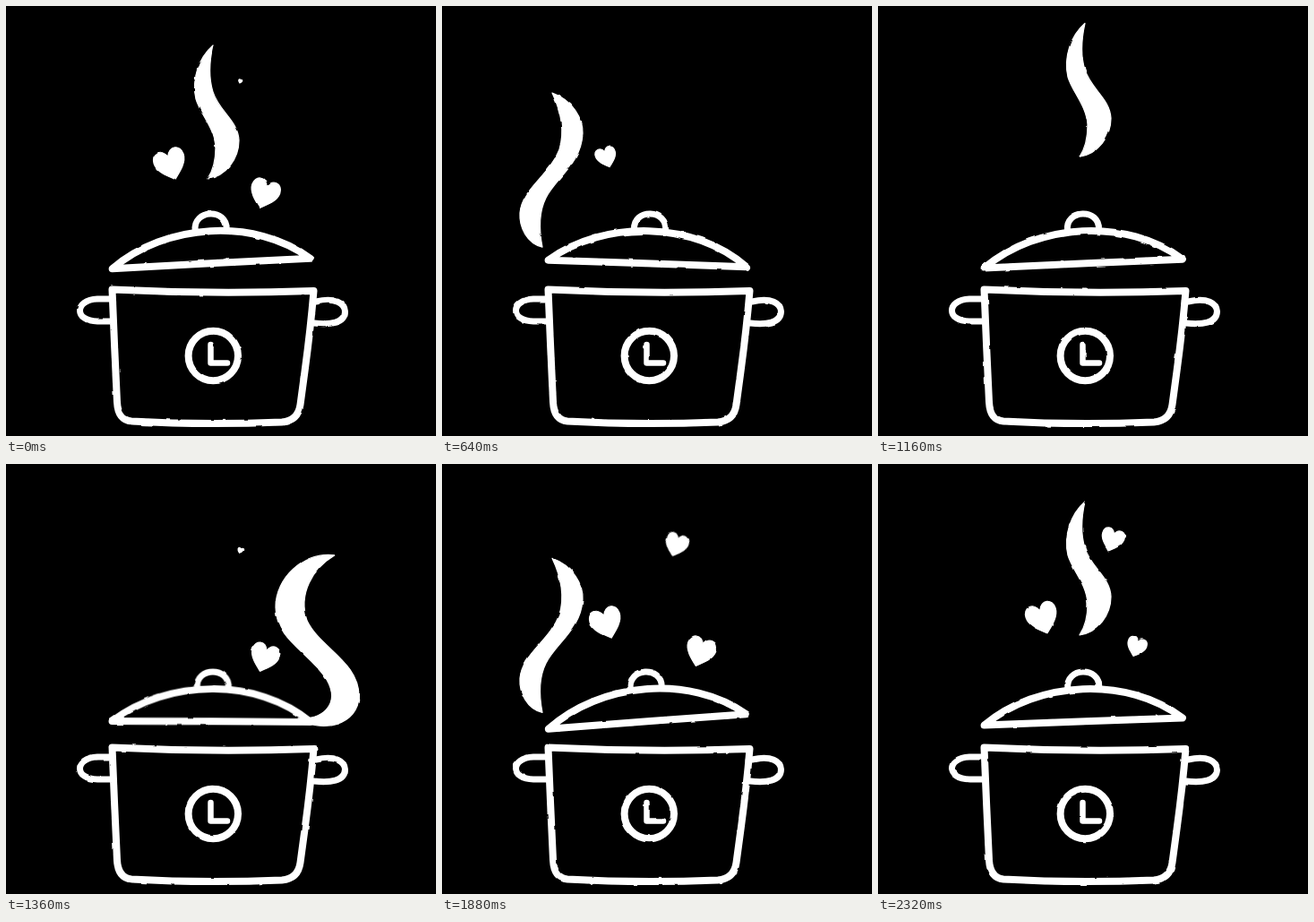
An HTML page for the animation above (2.36 s loop, 480 by 480 pixels).

```html
<!DOCTYPE html>
<html lang="en">
<head>
<meta charset="utf-8">
<title>Simmering pot</title>
<style>
  html, body { margin: 0; width: 100%; height: 100%; overflow: hidden; background: #000; }
  svg { display: block; width: 100%; height: 100%; }
  .line { fill: none; stroke: #fff; stroke-width: 8; stroke-linecap: round; stroke-linejoin: round; }
  .thin { stroke-width: 7; }
  .fill { fill: #fff; stroke: #fff; stroke-width: 1.2; stroke-linejoin: round; }
  .fill path { vector-effect: non-scaling-stroke; }
</style>
</head>
<body>
<svg viewBox="0 0 480 480">
  <defs>
    <filter id="rough" filterUnits="userSpaceOnUse" x="0" y="0" width="480" height="480" color-interpolation-filters="sRGB">
      <feTurbulence id="noise" type="fractalNoise" baseFrequency="0.08" numOctaves="1" seed="1"/>
      <feDisplacementMap in="SourceGraphic" scale="2.5" xChannelSelector="R" yChannelSelector="G"/>
    </filter>
  </defs>
  <g filter="url(#rough)">
    <g class="line">
      <path d="M118.500 316.500Q230 322 343.500 318Q340 360 333.500 408L328.500 445Q326 463 308 464.500Q220 468 140 463.500Q125 462 124 442Q121 380 118.500 316.500Z"/>
      <path class="thin" d="M117 327H102C76 328 76 352 102 352H117"/>
      <path class="thin" d="M346 330C368 325 378 332 378.500 341C378 354 362 356 344 354"/>
      <circle cx="231.300" cy="390.500" r="27.700"/>
      <path style="stroke-width:6.500" d="M228.500 378V398.500H247"/>
    </g>
    <g id="lid" class="line">
      <path d="M118.500 288C180 240 280 238 340 287Q230 287 118.500 288Z"/>
      <path class="thin" d="M213 250C211 226 250 226 248 250"/>
    </g>
    <g id="puffs" class="fill"></g>
    <g id="hearts" class="fill"></g>
  </g>
</svg>
<script>
const LOOP = 2360;
const $ = id => document.getElementById(id);

function addPath(parent, d) {
  const p = document.createElementNS('http://www.w3.org/2000/svg', 'path');
  p.setAttribute('d', d);
  return $(parent).appendChild(p);
}

// Each run: [start, end, time at which the offset is zero]
const puffs = [
  {
    d: 'M231 44C215 58 207 82 212 104C217 121 233 136 234 158C234 174 231 184 225 193C246 190 260 170 260 150C259 128 238 118 231 96C226 80 227 62 231 44Z',
    speed: 0.108, runs: [[0, 300, 0], [860, 1250, 932], [2240, LOOP, 2302]]
  },
  {
    d: 'M367 83C332 79 301 108 301 141C301 178 340 192 358 222C374 250 352 268 326 265C352 283 394 272 394 240C394 202 350 186 336 156C326 126 342 98 367 83Z',
    speed: 0.084, runs: [[100, 560, 360], [1200, 1840, 1585]]
  },
  {
    d: 'M123 121C146 129 158 150 157 167C155 200 128 215 116 238C108 254 108 272 112 293C95 289 86 271 87 255C89 228 120 213 131 184C137 164 133 142 123 121Z',
    speed: 0.085, runs: [[300, 780, 360], [1720, 2200, 1697]]
  }
].map(p => ({ ...p, el: addPath('puffs', p.d) }));

const heartShape = 'M0 .52C-.24 .32-.51 .1-.51-.18C-.51-.52-.13-.6 0-.26C.13-.6 .51-.52 .51-.18C.51 .1 .24 .32 0 .52Z';
// Each run: [pop start, end, y at loop time zero]
const hearts = [
  { x: 183.5, size: 34, turn: -18, runs: [[-400, 720, 176.5], [1600, 2700, 201]] },
  { x: 288.5, size: 32, turn: 18, runs: [[-700, 426, 209.5], [1305, 2400, 233]] },
  { x: 261.5, size: 25, turn: 18, runs: [[-1000, 20, 84], [1348, 2440, 113.5]] }
].map(h => ({ ...h, el: addPath('hearts', heartShape) }));

const activeRun = (runs, t) => runs.find(([from, to]) => t >= from && t < to);

// Pop in with overshoot, hold, shrink away
function popScale(age, left) {
  const grow = age < 80 ? 1.38 * age / 80 : Math.max(1, 1.38 - 0.38 * (age - 80) / 120);
  return grow * Math.min(1, left / 120);
}

function place(el, transform) {
  el.setAttribute('display', transform ? 'inline' : 'none');
  if (transform) el.setAttribute('transform', transform);
}

function draw(t) {
  // The lid rattles as a triangle wave
  const phase = (t / 233 + 0.91) % 1;
  const tilt = 19 * (1 - 4 * Math.min(phase, 1 - phase)) - 2;
  const angle = -Math.atan(tilt / 224) * 180 / Math.PI;
  $('lid').setAttribute('transform', `rotate(${angle} 230 288)`);

  for (const p of puffs) {
    const run = activeRun(p.runs, t);
    place(p.el, run && `translate(0 ${(run[2] - t) * p.speed})`);
  }
  for (const h of hearts) {
    const run = activeRun(h.runs, t);
    const s = run && h.size * popScale(t - run[0], run[1] - t);
    place(h.el, run && `translate(${h.x} ${run[2] - t * 0.0125}) rotate(${h.turn}) scale(${s})`);
  }
  $('noise').setAttribute('seed', 1 + Math.floor(t / 120));
}

function tick() {
  draw(performance.now() % LOOP);
  requestAnimationFrame(tick);
}
tick();
</script>
</body>
</html>
```
